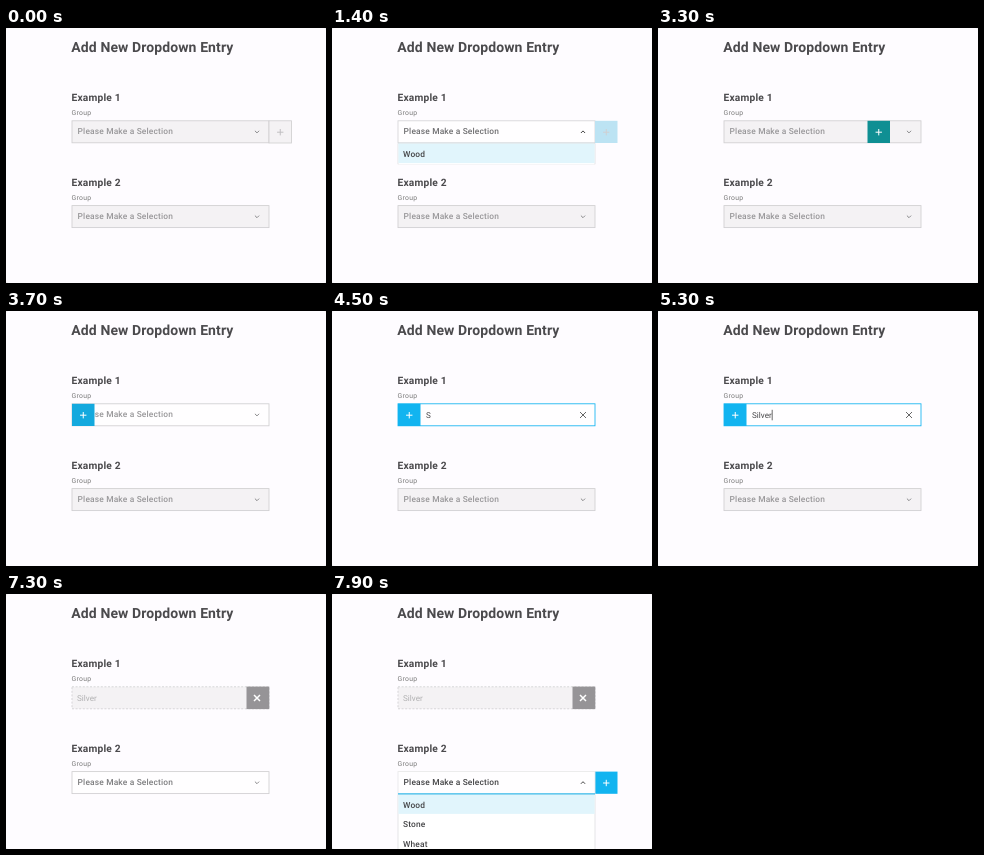
These frames come from a looping animation (320 by 255 pixels, 8 s). An HTML page:

```html
<!DOCTYPE html>
<html lang="en">
<head>
<meta charset="utf-8">
<title>Add New Dropdown Entry</title>
<style>
  html, body { margin: 0; width: 100%; height: 100%; overflow: hidden; background: #e9e9ea; }
  svg { display: block; width: 320px; height: 255px; font-family: Roboto, Arial, sans-serif; text-rendering: geometricPrecision; }
  .title { font-size: 14px; font-weight: 600; letter-spacing: .1px; fill: #4b4a4d; }
  .heading { font-size: 10.2px; font-weight: 600; letter-spacing: .2px; fill: #4b4a4d; }
  .label { font-size: 6.8px; letter-spacing: .3px; fill: #777; }
  .option { font-size: 8.4px; font-weight: 500; letter-spacing: .16px; }
  .entry { font-size: 8.1px; letter-spacing: .03px; }
</style>
</head>
<body>
<svg id="stage" viewBox="0 0 320 255"></svg>
<script>
const LOOP = 8000, STEP = 100;
const LEFT = 66, RIGHT = 263, WIDTH = RIGHT - LEFT, HEIGHT = 22, BUTTON = 22.5;
const ROW = 19.6, OPTIONS = ['Wood', 'Stone', 'Wheat', 'Clay'];
const GREY = [244, 242, 244], WHITE = [255, 254, 255], LINE = [208, 207, 209];
const MUTED = [152, 151, 153], HOVER = [125, 125, 127], DARK = [68, 68, 70];
const BLUE = [18, 180, 240], CYAN = [18, 198, 208], TEAL = [15, 143, 147], SEA = [20, 169, 222];
const stage = document.getElementById('stage');

const ramp = (t, from, to) => Math.min(1, Math.max(0, (t - from) / (to - from)));
const mix = (a, b, p) => Array.isArray(a) ? a.map((v, i) => mix(v, b[i], p)) : a + (b - a) * p;
const rgb = c => `rgb(${c.map(Math.round)})`;

// Interpolates between [time, value] keys.
function track(t, ...keys) {
  let i = 0;
  while (i < keys.length - 2 && t >= keys[i + 1][0]) i++;
  const [a, b] = [keys[i], keys[i + 1]];
  return mix(a[1], b[1], ramp(t, a[0], b[0]));
}

const text = (x, y, cls, str, fill = '', opacity = 1) =>
  `<text x="${x}" y="${y}" class="${cls}" ${fill && `fill="${fill}"`} opacity="${opacity}">${str}</text>`;
const rect = (x, y, w, h, fill, extra = '') =>
  `<rect x="${x}" y="${y}" width="${w}" height="${h}" fill="${fill}" ${extra}/>`;
const path = (d, color, width = 1, opacity = 1) =>
  `<path d="${d}" fill="none" stroke="${color}" stroke-width="${width}" opacity="${opacity}"/>`;

const field = (y, fill, line, dash = '') =>
  rect(LEFT, y, WIDTH, HEIGHT, rgb(fill), `stroke="${rgb(line)}" stroke-width=".85" stroke-dasharray="${dash}"`);
const placeholder = (y, color, opacity = 1) =>
  text(71.6, y + 13.2, 'option', 'Please Make a Selection', rgb(color), opacity);
const chevron = (y, up, color, opacity = 1) =>
  path(`M248.9 ${y + (up ? 12.2 : 10)}l2.1 ${up ? -2.1 : 2.1}l2.1 ${up ? 2.1 : -2.1}`, color, 1, opacity);
const cross = (y, color, width, opacity = 1) =>
  path(`M248 ${y + 8.2}l6 6m0 -6l-6 6`, color, width, opacity);

function plus(x, y, fill, sign = 'white', line = 'none', opacity = 1) {
  const cx = x + BUTTON / 2, cy = y + 11.4;
  return `<g opacity="${opacity}">` +
    rect(x, y, BUTTON, HEIGHT + .2, rgb(fill), `stroke="${line}" stroke-width=".85"`) +
    path(`M${cx - 3.2} ${cy}h6.4M${cx} ${cy - 3.2}v6.4`, sign, 1) + '</g>';
}

function list(y, open) {
  if (!open) return '';
  const top = y + HEIGHT + .7, h = OPTIONS.length * ROW + 2, id = 'list' + y;
  const rows = OPTIONS.map((name, i) => text(71, top + 13.2 + i * ROW, 'option', name, rgb(DARK)));
  return `<clipPath id="${id}">${rect(60, top, 210, (h + 3) * open, '#000')}</clipPath>` +
    `<g clip-path="url(#${id})">` +
    rect(LEFT, top, WIDTH, h + 1.5, '#000', 'opacity=".18"') +
    rect(LEFT, top, WIDTH, h, '#fff', 'stroke="#dedee0" stroke-width=".8"') +
    rect(LEFT + .4, top, WIDTH - .8, ROW, '#e1f5fc') + rows.join('') + '</g>';
}

const underline = (y, color, open) =>
  open ? path(`M${LEFT} ${y + HEIGHT + .3}H${RIGHT}`, rgb(color), 1, open) : '';

function selectField(y, hover, open, accent) {
  return field(y, mix(GREY, WHITE, hover), mix(LINE, [232, 232, 233], open)) +
    placeholder(y, mix(mix(MUTED, HOVER, hover), DARK, open)) +
    chevron(y, open > 0, open ? '#444' : '#8a8a8c') +
    list(y, open) + underline(y, accent, open);
}

function sections() {
  return [0, 85].map((dy, i) =>
    text(65.5, 73.2 + dy, 'heading', 'Example ' + (i + 1)) + text(65.5, 87.2 + dy, 'label', 'Group')).join('');
}

function editor(y, t, accent) {
  const slide = 1 - (1 - ramp(t, 3200, 3700)) ** 1.42;
  const active = ramp(t, 3700, 4000), saved = ramp(t, 5600, 6000);
  const typed = [4500, 4600, 4800, 4900, 5100, 5200].filter(at => t >= at).length;
  const word = 'Silver'.slice(0, typed), shift = 23 * (1 - saved);
  const fill = mix(mix(GREY, WHITE, ramp(t, 3300, 3700)), GREY, saved);
  const line = mix(mix(LINE, BLUE, active), LINE, saved);
  let out = field(y, fill, line, saved > .5 ? '2 1.6' : '');
  if (active < 1) out += placeholder(y, MUTED, 1 - active) + chevron(y, false, '#8a8a8c', 1 - active);
  if (word) out += text(71 + shift, y + 14, 'entry', word, rgb(mix(DARK, [176, 176, 177], saved)));
  if (t >= 5300 && !saved) out += path(`M114.2 ${y + 6}v10.5`, '#444', .8);
  if (saved < 1) {
    out += cross(y, '#666', 1, active);
    out += plus(mix(RIGHT, LEFT, slide), y, accent, 'white', 'none', 1 - saved);
  }
  if (saved) {
    out += `<g opacity="${saved}">` + rect(240.5, y - .2, 22.8, HEIGHT + .5, '#969497') +
      cross(y, 'white', 1.5) + '</g>';
  }
  return out;
}

function draw(t) {
  const y1 = 92.8, y2 = 177.6;
  const accent = track(t, [1300, GREY], [1700, BLUE], [1900, BLUE], [2100, CYAN], [2300, CYAN],
    [3000, TEAL], [3300, TEAL], [3700, SEA], [4300, BLUE]);
  const open1 = ramp(t, 1300, 1700), open2 = ramp(t, 7500, 7900);
  const hover2 = ramp(t, 7100, 7300);

  let out = rect(0, 0, 320, 255, '#fefcff', 'rx="2.5"') +
    text(65.3, 24.3, 'title', 'Add New Dropdown Entry') + sections();
  if (open2) out += plus(mix(RIGHT - BUTTON, RIGHT, open2), y2, BLUE);
  out += selectField(y2, hover2, open2, BLUE);

  if (t < 3300) {
    const sign = rgb(mix([192, 191, 193], WHITE, open1));
    out += selectField(y1, ramp(t, 1000, 1300), open1, accent) +
      plus(RIGHT, y1, accent, sign, open1 ? 'none' : rgb(LINE));
  } else {
    out += editor(y1, t, accent);
  }
  stage.innerHTML = out;
}

const start = performance.now();
let shown = -1;
function tick() {
  const t = Math.floor(((performance.now() - start) % LOOP) / STEP) * STEP;
  if (t !== shown) draw(shown = t);
  requestAnimationFrame(tick);
}
tick();
</script>
</body>
</html>
```
